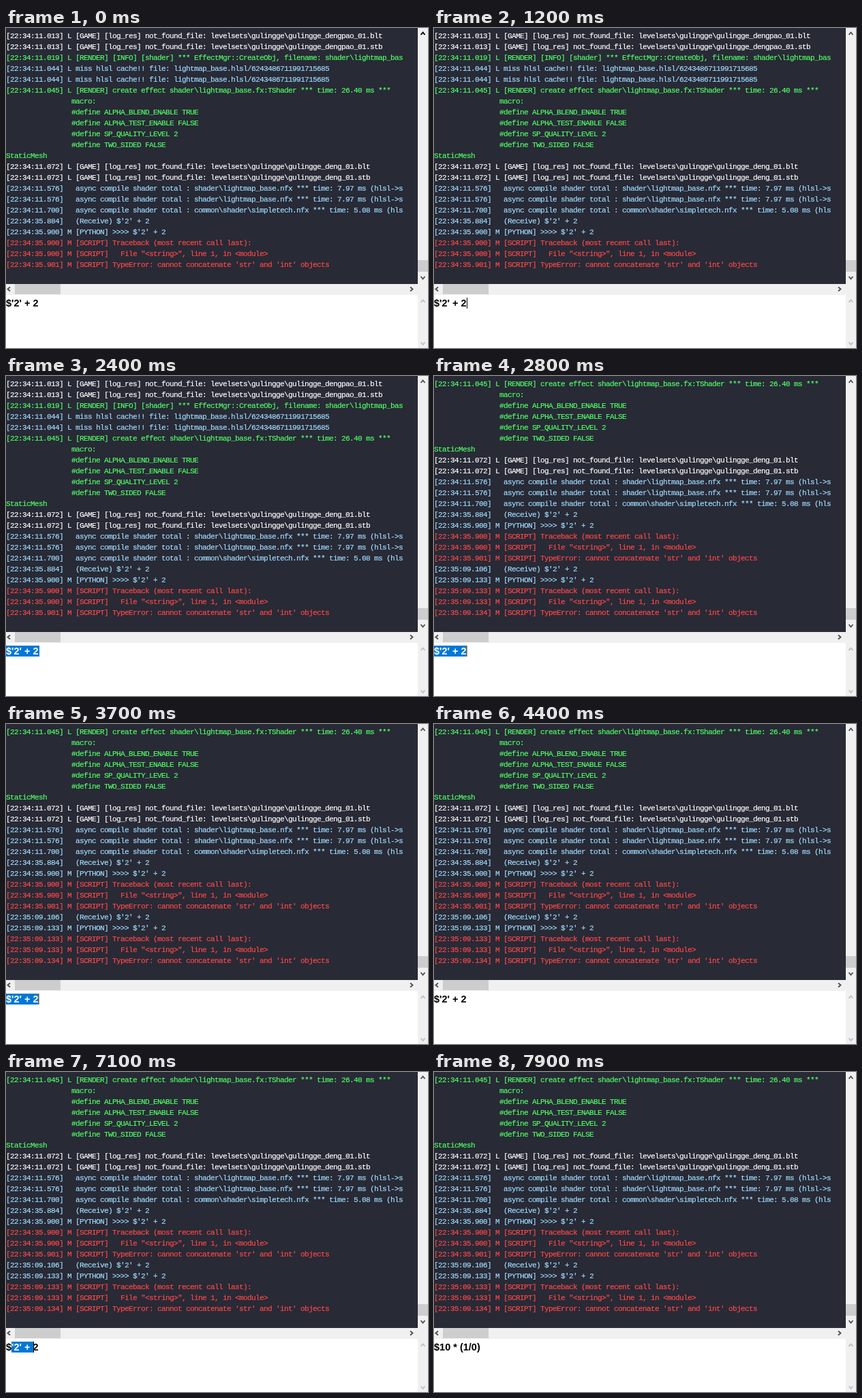
An HTML page that plays this animation: 619x470 px, repeating every 8000 ms.

```html
<!DOCTYPE html>
<html lang="en">
<head>
<meta charset="utf-8">
<title>Script console</title>
<style>
html, body { margin: 0; width: 100%; height: 100%; overflow: hidden; background: #fff; }
.stage { position: absolute; left: 0; top: 0; width: 619px; height: 470px; overflow: hidden; background: #fff; }
.stage > *, .input > * { position: absolute; left: 0; top: 0; }

.console { width: 604px; height: 376px; background: #282a36; }
.stage > .view { top: 4px; width: 604px; height: 352px; overflow: hidden; }
.log {
  margin: 0; color: #fff;
  font: 11px/16px "Liberation Mono", monospace; letter-spacing: -.6px;
  font-variant-ligatures: none; -webkit-text-stroke: .2px;
  animation: scroll 8s step-end infinite;
}
.g { color: #50ff64; }
.b { color: #a0dcff; }
.r { color: #ff4848; }

.arrow { fill: none; stroke: #505050; stroke-width: 1.9; }
.off { stroke: #bfbfbf; }
.hover { animation: cool 8s step-end infinite; }

.stage > .input {
  top: 396px; width: 603px; height: 16px; color: #000;
  font: bold 14.5px/16px "Liberation Sans", Arial, sans-serif; white-space: nowrap;
}
.before { animation: before 8s step-end infinite; }
.after { animation: after 8s step-end infinite; }
.selection {
  width: 49px; height: 16px; overflow: hidden; background: #0078d7; color: #fff;
  animation: select 8s step-end infinite;
}
.caret { width: 1px; height: 16px; animation: caret 8s step-end infinite; }

@keyframes scroll {
  0% { transform: none; }
  35%, 100% { transform: translateY(-80px); }
}
@keyframes cool {
  0% { stroke: #000; }
  3.75% { stroke: #101010; }
  6.25% { stroke: #282828; }
  7.5% { stroke: #404040; }
  8.75%, 100% { stroke: #505050; }
}
@keyframes before {
  0% { opacity: 1; }
  92.5%, 100% { opacity: 0; }
}
@keyframes after {
  0% { opacity: 0; }
  92.5%, 100% { opacity: 1; }
}
@keyframes select {
  0%, 55%, 92.5%, 100% { clip-path: inset(0 49px 0 0); }
  21.25% { clip-path: inset(0 0 0 12px); }
  22.5% { clip-path: inset(0); }
  86.25% { clip-path: inset(0 29px 0 8px); }
  87.5% { clip-path: inset(0 21px 0 8px); }
  88.75% { clip-path: inset(0 9px 0 8px); }
  90% { clip-path: inset(0 0 0 8px); }
}
/* The caret inverts what lies below: black on white, orange on the selection. */
@keyframes caret {
  0%, 30%, 40%, 52.5%, 98.75%, 100% { transform: none; background: transparent; }
  15% { transform: translateX(48px); background: #000; }
  21.25% { transform: translateX(12px); background: #ff8728; }
  22.5% { transform: none; background: #ff8728; }
  35%, 46.25% { transform: translateX(48px); background: #ff8728; }
  80% { transform: translateX(8px); background: #000; }
  86.25% { transform: translateX(20px); background: #000; }
  87.5% { transform: translateX(28px); background: #000; }
  88.75% { transform: translateX(40px); background: #000; }
  90% { transform: translateX(48px); background: #ff8728; }
  92.5% { transform: translateX(66px); background: #000; }
}
</style>
</head>
<body>
<div class="stage">
  <div class="console"></div>
  <div class="view"><pre class="log">[22:34:11.013] L [GAME] [log_res] not_found_file: levelsets\gulingge\gulingge_dengpao_01.blt
[22:34:11.013] L [GAME] [log_res] not_found_file: levelsets\gulingge\gulingge_dengpao_01.stb
<span class="g">[22:34:11.019] L [RENDER] [INFO] [shader] *** EffectMgr::CreateObj, filename: shader\lightmap_bas</span>
<span class="b">[22:34:11.044] L miss hlsl cache!! file: lightmap_base.hlsl/6243486711991715685
[22:34:11.044] L miss hlsl cache!! file: lightmap_base.hlsl/6243486711991715685</span>
<span class="g">[22:34:11.045] L [RENDER] create effect shader\lightmap_base.fx:TShader *** time: 26.40 ms ***
                macro:
                #define ALPHA_BLEND_ENABLE TRUE
                #define ALPHA_TEST_ENABLE FALSE
                #define SP_QUALITY_LEVEL 2
                #define TWO_SIDED FALSE
StaticMesh</span>
[22:34:11.072] L [GAME] [log_res] not_found_file: levelsets\gulingge\gulingge_deng_01.blt
[22:34:11.072] L [GAME] [log_res] not_found_file: levelsets\gulingge\gulingge_deng_01.stb
<span class="b">[22:34:11.576]   async compile shader total : shader\lightmap_base.nfx *** time: 7.97 ms (hlsl-&gt;s
[22:34:11.576]   async compile shader total : shader\lightmap_base.nfx *** time: 7.97 ms (hlsl-&gt;s
[22:34:11.700]   async compile shader total : common\shader\simpletech.nfx *** time: 5.08 ms (hls
[22:34:35.884]   (Receive) $'2' + 2
[22:34:35.900] M [PYTHON] &gt;&gt;&gt;&gt; $'2' + 2</span>
<span class="r">[22:34:35.900] M [SCRIPT] Traceback (most recent call last):
[22:34:35.900] M [SCRIPT]   File "&lt;string&gt;", line 1, in &lt;module&gt;
[22:34:35.901] M [SCRIPT] TypeError: cannot concatenate 'str' and 'int' objects</span>
<span class="b">[22:35:09.106]   (Receive) $'2' + 2
[22:35:09.133] M [PYTHON] &gt;&gt;&gt;&gt; $'2' + 2</span>
<span class="r">[22:35:09.133] M [SCRIPT] Traceback (most recent call last):
[22:35:09.133] M [SCRIPT]   File "&lt;string&gt;", line 1, in &lt;module&gt;
[22:35:09.134] M [SCRIPT] TypeError: cannot concatenate 'str' and 'int' objects</span></pre></div>

  <svg width="619" height="470">
    <path fill="#f0f0f0" d="M604 0h15v470h-15zM0 376h604v16H0z"/>
    <path fill="#cdcdcd" d="M604 341h15v17h-15zM13 376h67v15H13z"/>
    <g class="arrow">
      <path class="hover" d="M608.5 10l3-3.5 3 3.5"/>
      <path d="M608.5 365l3 3.5 3-3.5"/>
      <path d="M6 380.5l-3.5 3 3.5 3"/>
      <path d="M593 380.5l3.5 3-3.5 3"/>
      <path class="off" d="M608.5 403l3-3.5 3 3.5"/>
      <path class="off" d="M608.5 461.5l3 3.5 3-3.5"/>
    </g>
  </svg>

  <div class="input">
    <span class="before">$'2' + 2</span>
    <span class="after">$10 * (1/0)</span>
    <span class="selection">$'2' + 2</span>
    <i class="caret"></i>
  </div>
</div>
</body>
</html>
```
